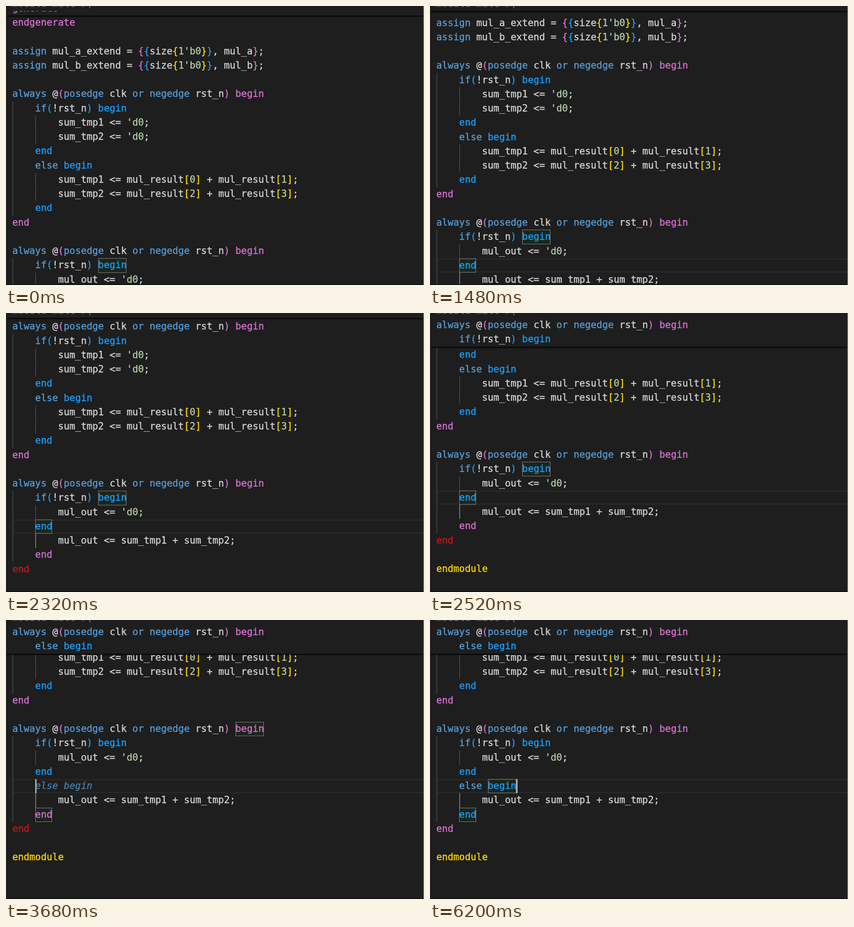
Recreate the animation shown at these times as an HTML page. Size 916 by 611 pixels, loop 6.68 s.

```html
<!DOCTYPE html>
<html lang="en">
<head>
<meta charset="utf-8">
<title>Verilog editor</title>
<style>
  html, body { margin: 0; width: 100%; height: 100%; overflow: hidden; background: #1e1e1e; }
  #stage {
    position: relative; width: 916px; height: 611px; overflow: hidden;
    background: #1e1e1e; color: #d4d4d4;
    font: 20.83px/31.25px "DejaVu Sans Mono", Menlo, monospace;
    font-variant-ligatures: none;
    -webkit-text-stroke-width: .4px;
  }
  #stage div { position: absolute; box-sizing: border-box; }
  #doc, .page { left: 0; top: 0; width: 916px; }
  .row { left: 13.7px; height: 31.25px; white-space: pre; }
  .guide { width: 1.7px; height: 31.25px; background: #404040; }
  .guide.active { background: #757575; }
  .current { left: 14px; width: 910px; height: 31.25px; border: 3px solid #282828; }
  .box { height: 31.25px; border: 1.7px solid #888; background: rgba(0, 100, 0, .1) padding-box; }
  #caret { width: 3.4px; height: 31.25px; background: #aeafad; }
  .k { color: #569cd6; }
  .n { color: #b5cea8; }
  .d0 { color: #ffd700; }
  .d1 { color: #da70d6; }
  .d2 { color: #179fff; }
  .bad { color: #c81616; }
  .ghost { color: #467fab; font-style: italic; }
  #shade { left: 0; top: -40px; width: 916px; background: #1e1e1e; box-shadow: #000 0 4px 2px -2px; }
  .sticky { left: 0; top: 0; width: 916px; height: 31.25px; padding-left: 13.7px; white-space: pre; background: #1e1e1e; }
  #module { top: -20.25px; color: #666; }
  .edge { right: 0; bottom: 0; }
</style>
</head>
<body>
<div id="stage">
  <div id="doc"></div>
  <div id="shade"></div>
  <div id="pinned"></div>
  <div id="module" class="sticky">module mult #(</div>
  <div class="edge" style="width:916px;height:2px;background:#111"></div>
  <div class="edge" style="width:1px;height:611px;background:#bbb"></div>
</div>
<script>
const LOOP = 6680, STEP = 40;
const LINE = 31.25, CHAR = 12.54, LEFT = 13.7, TOP = 21.3, PIN = 11;
const INSERT = 3190, HINT = 3440, ACCEPT = 5720;
const SCROLL = [[1160, 0], [1480, 62.5], [1880, 127], [2320, 163], [2720, 290], [2800, 298]];

const CLOCK = 'always @(posedge clk or negedge rst_n) begin';
const source = `endgenerate

assign mul_a_extend = {{size{1'b0}}, mul_a};
assign mul_b_extend = {{size{1'b0}}, mul_b};

${CLOCK}
    if(!rst_n) begin
        sum_tmp1 <= 'd0;
        sum_tmp2 <= 'd0;
    end
    else begin
        sum_tmp1 <= mul_result[0] + mul_result[1];
        sum_tmp2 <= mul_result[2] + mul_result[3];
    end
end

${CLOCK}
    if(!rst_n) begin
        mul_out <= 'd0;
    end
        mul_out <= sum_tmp1 + sum_tmp2;
    end
end

endmodule`.split('\n');

const withLine = text => [...source.slice(0, 20), text, ...source.slice(20)];
const $ = id => document.getElementById(id);

function add(parent, cls, style, html = '') {
  const el = document.createElement('div');
  el.className = cls;
  Object.assign(el.style, style);
  el.innerHTML = html;
  parent.append(el);
  return el;
}

// Colours keywords, numbers and nested pairs by depth.
function highlight(lines) {
  const open = ['module'];
  const TOKEN = /\b(begin|end|endgenerate|endmodule)\b|([({[])|([)}\]])|\b(always|posedge|negedge|or|if|else|assign)\b|(\d?'[bd]\d+|\b\d\b)/g;
  const span = (cls, text) => `<span class="${cls}">${text}</span>`;
  const pair = (depth, text) => span('d' + depth % 3, text);
  return lines.map(line => line.replace(TOKEN, (text, word, left, right, key) => {
    if (key) return span('k', text);
    if (text === 'endgenerate') return pair(1, text);
    if (text === 'endmodule') return pair(0, text);
    if (word === 'begin' || left) {
      open.push(text);
      return pair(open.length - 1, text);
    }
    if (word === 'end' && open[open.length - 1] !== 'begin') return span('bad', text);
    if (word || right) {
      open.pop();
      return pair(open.length, text);
    }
    return span('n', text);
  }).replace('<=', '&lt;='));
}

function makePage(lines, current, boxes) {
  const page = add($('doc'), 'page', {});
  const at = (row, col) => ({ top: row * LINE + 'px', left: LEFT + col * CHAR + 'px' });
  add(page, 'current', { top: current * LINE + 'px' });
  for (const [row, col, len] of boxes)
    add(page, 'box', { ...at(row, col), width: len * CHAR + 'px' });
  highlight(lines).forEach((html, i) => {
    const indent = lines[i].search(/\S|$/);
    for (let col = 0; col < indent; col += 4) {
      const active = col === 4 && i === current + 1;
      const guide = add(page, active ? 'guide active' : 'guide', at(i, col));
      guide.style.marginLeft = '.6px';
    }
    add(page, 'row', { top: i * LINE + 'px' }, html);
  });
  return page;
}

const pages = [
  makePage(source, 19, [[17, 15, 5], [19, 4, 3]]),
  makePage(withLine('    '), 20, [[16, 39, 5], [22, 4, 3]]),
  makePage(withLine('    else begin'), 20, [[20, 9, 5], [22, 4, 3]])
];
const ghost = add(pages[1], 'row ghost', { top: 20 * LINE + 'px' }, '    else begin');
const caret = add($('doc'), '', {});
caret.id = 'caret';

// Block headers that stay pinned: first line, last inner line, slot.
const colored = highlight(source);
const pins = [
  { first: 6, last: 8, slot: 1, html: colored[6] },
  { first: 10, last: 12, slot: 1, html: colored[10] },
  { first: -9, last: -1, slot: 0, html: '<span class="d1">generate</span>' },
  { first: 5, last: 13, slot: 0, html: colored[5] }
];
for (const pin of pins) pin.el = add($('pinned'), 'sticky', {}, pin.html);

function scrollAt(t) {
  if (t <= SCROLL[0][0]) return 0;
  for (let i = 1; i < SCROLL.length; i++) {
    const [t0, y0] = SCROLL[i - 1], [t1, y1] = SCROLL[i];
    if (t <= t1) return y0 + (y1 - y0) * (t - t0) / (t1 - t0);
  }
  return SCROLL[SCROLL.length - 1][1];
}

function caretOn(t) {
  if (t >= ACCEPT) return true;
  return t >= INSERT ? (t - INSERT) % 1000 < 500 : (t + 400) % 1000 < 500;
}

function draw(t) {
  const offset = TOP - scrollAt(t);
  const state = t < INSERT ? 0 : t < ACCEPT ? 1 : 2;
  $('doc').style.transform = `translateY(${offset}px)`;
  pages.forEach((page, i) => page.style.display = i === state ? '' : 'none');
  ghost.style.display = t >= HINT ? '' : 'none';
  caret.style.top = (state ? 20 : 19) * LINE + 'px';
  caret.style.left = LEFT + [7, 4, 14][state] * CHAR - .3 + 'px';
  caret.style.display = caretOn(t) ? '' : 'none';

  let bottom = PIN;
  for (const { first, last, slot, el } of pins) {
    const rest = PIN + slot * LINE;
    const y = Math.min(rest, offset + last * LINE);
    const shown = offset + first * LINE < rest && y > rest - LINE;
    el.style.display = shown ? '' : 'none';
    el.style.transform = `translateY(${y}px)`;
    if (shown) bottom = Math.max(bottom, y + LINE);
  }
  $('shade').style.height = bottom + 40 + 'px';
}

const start = performance.now();
function tick() {
  const t = (performance.now() - start) % LOOP;
  draw(Math.floor(t / STEP) * STEP);
  requestAnimationFrame(tick);
}
tick();
</script>
</body>
</html>
```
